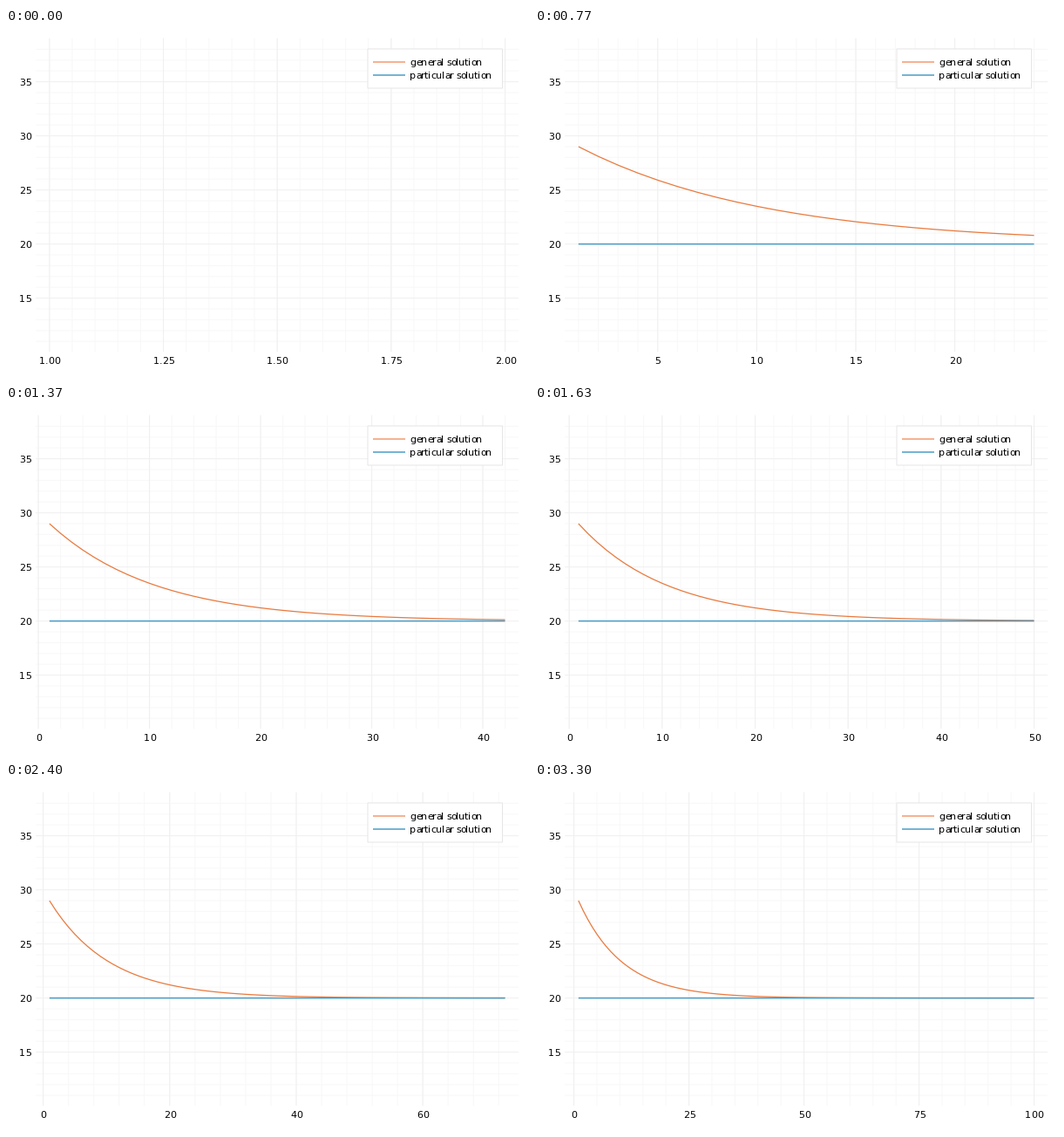
Write a matplotlib script that moves like this. It is 600 px wide and 400 px high and loops after 3330 ms.

```python
import math

import matplotlib.pyplot as plt
import numpy as np
from matplotlib.animation import FuncAnimation
from matplotlib.collections import LineCollection
from matplotlib.patches import Rectangle
from matplotlib.textpath import TextPath

W, H, DPI = 600, 400, 100
PX = 72 / DPI  # points per pixel
LEFT, RIGHT, TOP, BOTTOM = 34.2, 588.2, 11.8, 371.0
UNIT = 12.4  # pixels per unit of y
Y_ZERO = 247.6 + 20 * UNIT

ORANGE, BLUE = "#ea793d", "#469ac6"
KEY_ORANGE, KEY_BLUE = "#f4a57f", "#5ea7ce"
MAJOR, MINOR = "#f0f0f0", "#f8f8f8"
FONT_PT = 8
MAX_TICKS = 8
TICK_MS, TICKS = 10, 333

plt.rcParams["font.family"] = "DejaVu Sans"
fig = plt.figure(figsize=(W / DPI, H / DPI), dpi=DPI, facecolor="white")
ax = fig.add_axes([0, 0, 1, 1])
ax.set_xlim(0, W)
ax.set_ylim(H, 0)
ax.axis("off")


def y_px(v):
    return Y_ZERO - v * UNIT


def pen_end(text):
    return TextPath((0, 0), text, size=FONT_PT / PX).get_extents().x1


# the pen moves by whole pixels after each glyph
ADVANCE = {c: math.floor(pen_end(c + "|") - pen_end("|"))
           for c in "0123456789. " + "abcdefghijklmnopqrstuvwxyz"}


def label(x, y, text, align=0.0):
    """Set text glyph by glyph; align 0, 0.5, 1 is left, centre, right."""
    width = sum(ADVANCE[c] for c in text)
    pen = math.floor(x - align * width + 0.5)
    glyphs = []
    for c in text:
        if c != " ":
            glyphs.append(ax.text(pen, y, c, fontsize=FONT_PT, ha="left",
                                  va="baseline", color="black", zorder=6))
        pen += ADVANCE[c]
    return glyphs


def stroke(xs, ys, color, width, z, snap=False):
    return ax.plot(xs, ys, color=color, lw=width * PX, zorder=z, snap=snap,
                   solid_capstyle="butt", solid_joinstyle="round")[0]


def grid(color, z):
    lines = LineCollection([], colors=color, linewidths=PX, zorder=z)
    lines.set_snap(False)
    return ax.add_collection(lines, autolim=False)


def multiples(step, lo, hi):
    first = math.ceil(lo / step - 1e-9)
    last = math.floor(hi / step + 1e-9)
    return step * np.arange(first, last + 1)


def best_step(lo, hi):
    """Tick step with the best mix of count, coverage and roundness."""
    span = hi - lo
    best, choice = -math.inf, None
    for power in (1, 0, -1, -2):
        for q, nice in ((2.5, 0.5), (1, 1), (5, 0.9), (2, 0.7), (3, 0.2)):
            step = q * 10.0 ** power
            count = len(multiples(step, lo, hi))
            if not 4 <= count <= MAX_TICKS:
                continue
            reach = math.ceil(hi / step) * step
            has_zero = lo <= 0 or reach < 2 * span
            score = ((1 - abs(count - 5) / 5) / 4 + has_zero / 6
                     + span / (2 * (count - 1) * step) + nice / 4)
            if score > best + 1e-9:
                best, choice = score, step
    return choice


def decimals(step):
    return next(d for d in range(4) if abs(round(step, d) - step) < 1e-9)


def vertical(xs):
    return [[(x, TOP), (x, BOTTOM)] for x in xs]


# fixed horizontal grid and y labels
for v in range(11, 39):
    major = v % 5 == 0
    stroke([LEFT, RIGHT], [y_px(v)] * 2, MAJOR if major else MINOR, 1,
           2 if major else 1)
    if major:
        label(29, y_px(v) + 4.2, str(v), align=1)

minor_grid = grid(MINOR, 1)
major_grid = grid(MAJOR, 2)
general = stroke([], [], ORANGE, 1.25, 3)
particular = stroke([], [], BLUE, 1.5, 4)
x_glyphs = []

# legend
ax.add_patch(Rectangle((415, 24), 154.5, 45, facecolor="white", snap=False,
                       edgecolor="#e6e6e6", lw=PX, zorder=5))
for y, color, text in ((39, KEY_ORANGE, "general solution"),
                       (54, KEY_BLUE, "particular solution")):
    stroke([421, 457.5], [y, y], color, 1.7, 6, snap=True)
    label(463, y + 4.2, text)


def update(tick):
    n = (3 * tick + 1) // 10 + 1  # thirty steps a second
    pad = 0.03 * max(n - 1, 1)
    lo, hi = 1 - pad, max(n, 2) + pad

    def x_px(v):
        return LEFT + (v - lo) / (hi - lo) * (RIGHT - LEFT)

    step = best_step(lo, hi)
    ticks = multiples(step, lo, hi)
    major_grid.set_segments(vertical(x_px(ticks)))
    minor_grid.set_segments(vertical(x_px(multiples(step / 5, lo, hi))))

    while x_glyphs:
        x_glyphs.pop().remove()
    places = decimals(step)
    for v in ticks:
        x_glyphs.extend(label(x_px(v), 385, f"{abs(v):.{places}f}", align=0.5))

    k = np.arange(1, n + 1)
    general.set_data(x_px(k), y_px(20 + 10 * 0.9 ** k))
    particular.set_data(x_px(k[[0, -1]]), [y_px(20)] * 2)
    for line in (general, particular):
        line.set_visible(n > 1)
    return [general, particular, major_grid, minor_grid, *x_glyphs]


anim = FuncAnimation(fig, update, frames=TICKS, interval=TICK_MS,
                     repeat=True, repeat_delay=0, blit=False)
plt.show()
```
